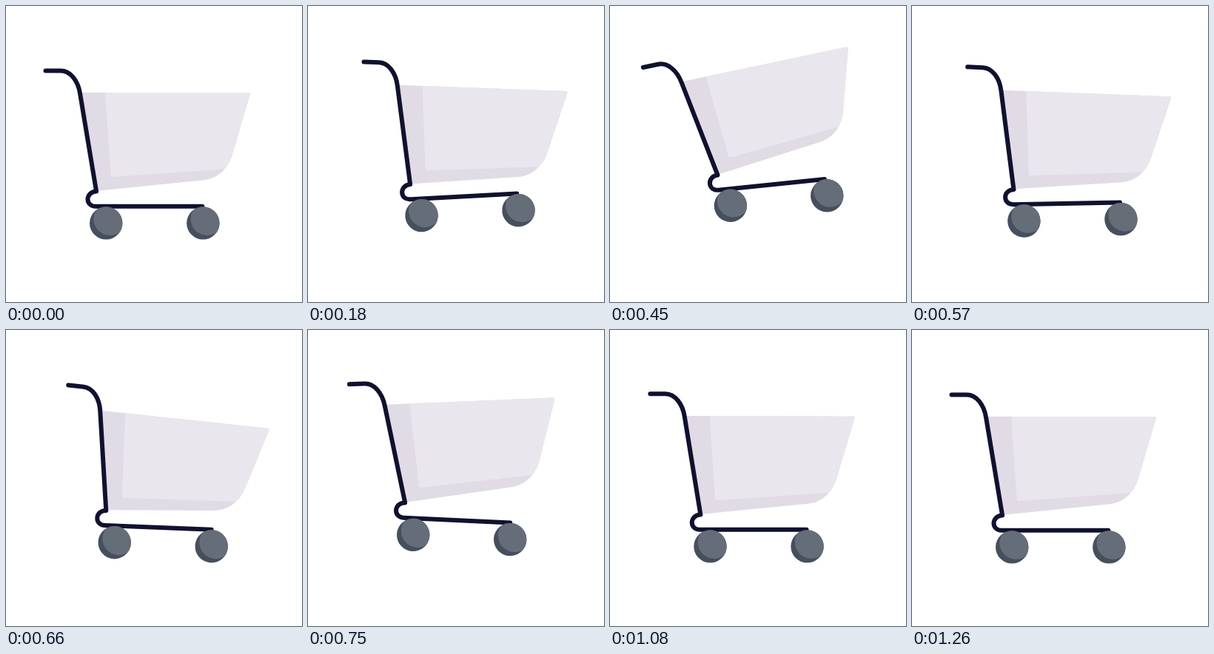
These frames come from a looping animation (400x400 px, 3290 ms). An HTML page with a canvas:

```html
<!DOCTYPE html>
<html lang="en">
<head>
<meta charset="utf-8">
<title>Shopping cart</title>
<style>
  html, body { margin: 0; width: 100%; height: 100%; overflow: hidden; background: #fff; }
  canvas { display: block; width: 100vmin; height: 100vmin; }
</style>
</head>
<body>
<canvas width="400" height="400"></canvas>
<script>
const ctx = document.querySelector('canvas').getContext('2d');
const LOOP = 3290, MOVE = 1260, STEP = 30;
const INK = '#10112f', SHADE = '#e0dbe5', LIGHT = '#eae6ed';
const TYRE = '#464f5d', HUB = '#646d78';

// Joint between basket stem and undercarriage at rest
const JOINT = { x: 122, y: 250 };

const easeOut = u => 1 - (1 - u) ** 2;
const easeInOut = u => (1 - Math.cos(Math.PI * u)) / 2;

// Swings from rest through turning points [time, value], then back to rest
const swing = (...turns) => t => {
  let t0 = 0, v0 = 0;
  for (const [t1, v1] of turns) {
    if (t < t1) return v0 + (v1 - v0) * easeInOut((t - t0) / (t1 - t0));
    t0 = t1;
    v0 = v1;
  }
  return 0;
};

// A big hop, a small hop, then settling
const lift = swing([415, 24], [600, 1.2], [750, 17.1], [960, 2], [1200, 0]);
const basketTilt = swing([130, 3.3], [415, -13], [640, 6.5], [795, -4.5], [960, 2.2], [1110, 0]);
const railTilt = swing([385, -6.8], [715, 2.9], [930, 0]);

// One push forward, then rolling back in time with the hops
const PUSH = 420, REACH = 23.8;
const rollBack = swing([PUSH, REACH], [620, 13.9], [800, 8], [960, 2.7], [1110, 0]);
const slide = t => t < PUSH ? REACH * easeOut(t / PUSH) : rollBack(t);

const basket = new Path2D(
  'M102 117H327.5Q330.2 117 329.6 120L307 197C301.5 219 287 233 267 235.3L122 250Z');
const basketLight = new Path2D(
  'M133.8 116L141.7 229Q142 231.2 144.2 231L296 220.3L340 217V116Z');
const handle = new Path2D('M53.5 87.5H74C87 87.5 97.3 101 100 118L122 250');
const rail = new Path2D(
  'M122 250.6C114.5 250.8 110.5 256 110.5 261.2C110.5 266.8 115 270.8 121 270.8H265.3');
const disc = new Path2D();
disc.arc(0, 0, 22.2, 0, 7);

const radians = deg => deg * Math.PI / 180;

function fill(path, color) {
  ctx.fillStyle = color;
  ctx.fill(path);
}

function stroke(path) {
  ctx.strokeStyle = INK;
  ctx.lineWidth = 6;
  ctx.lineCap = ctx.lineJoin = 'round';
  ctx.stroke(path);
}

function tilted(deg, paint) {
  ctx.save();
  ctx.translate(JOINT.x, JOINT.y);
  ctx.rotate(radians(deg));
  ctx.translate(-JOINT.x, -JOINT.y);
  paint();
  ctx.restore();
}

function wheel(x, y, turn) {
  ctx.save();
  ctx.translate(x, y);
  ctx.rotate(radians(turn));
  fill(disc, TYRE);
  ctx.clip(disc);
  ctx.translate(5.4, -5.7);
  fill(disc, HUB);
  ctx.restore();
}

function drawBasket() {
  fill(basket, SHADE);
  ctx.save();
  ctx.clip(basket);
  fill(basketLight, LIGHT);
  ctx.restore();
  stroke(handle);
}

function draw(t) {
  const tilt = railTilt(t);
  ctx.clearRect(0, 0, 400, 400);
  ctx.save();
  ctx.translate(slide(t), -lift(t));
  tilted(basketTilt(t), drawBasket);
  tilted(tilt, () => {
    stroke(rail);
    for (const x of [135.2, 266.3]) wheel(x, 293.4, tilt);
  });
  ctx.restore();
}

const start = performance.now();
function tick() {
  const t = (performance.now() - start) % LOOP;
  draw(Math.min(MOVE, Math.floor(t / STEP) * STEP));
  requestAnimationFrame(tick);
}
tick();
</script>
</body>
</html>
```
